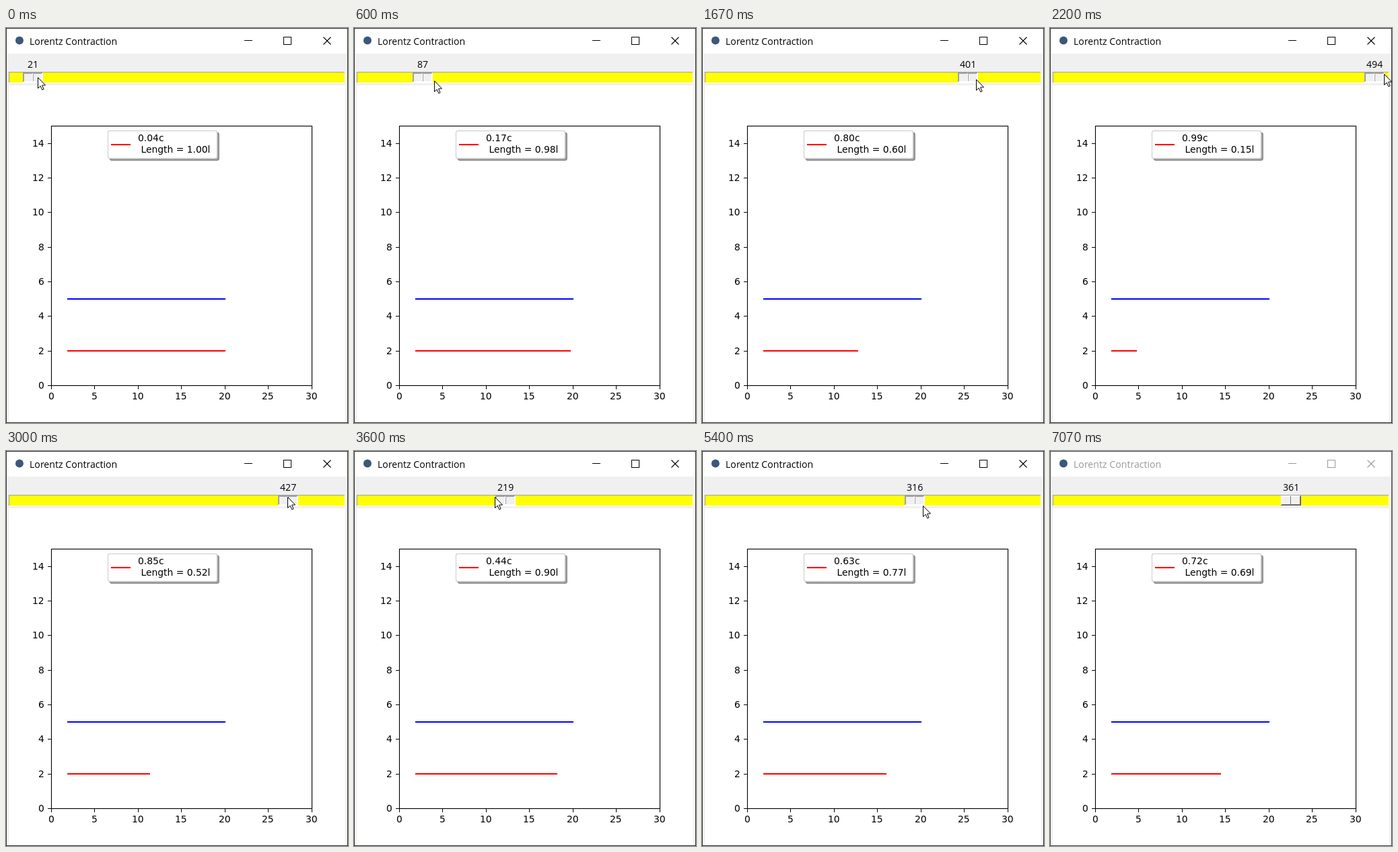
Write an HTML page with a canvas that moves like this. It is 508 by 586 pixels and loops after 7190 ms.

```html
<!DOCTYPE html>
<html lang="en">
<head>
<meta charset="utf-8">
<title>Lorentz Contraction</title>
<style>
  html, body { margin: 0; width: 100%; height: 100%; overflow: hidden; background: #fff; }
  canvas { display: block; }
</style>
</head>
<body>
<canvas id="stage" width="508" height="586"></canvas>
<script>
const ctx = document.getElementById('stage').getContext('2d');

const LOOP = 7190;
const STEP = 200 / 3;
const RELEASE = 87;
const BLUR = 106;

const UI_FONT = '14.15px "Open Sans", "Noto Sans", sans-serif';
const PLOT_FONT = '13.89px "DejaVu Sans", sans-serif';

// Cosine-eased move by `amount` between two steps
function sweep(step, from, to, amount) {
  const u = Math.min(1, Math.max(0, (step - from) / (to - from)));
  return amount * (1 - Math.cos(Math.PI * u)) / 2;
}

// The hand drags right, left, right again, then leaves the window
const sliderValue = s => Math.round(21
  + sweep(s, 0.5, 35.5, 479)
  + sweep(s, 37.35, 67.2, -476)
  + sweep(s, 66.71, 85.47, 337));

const cursorX = s => Math.round(47
  + sweep(s, -0.56, 36.3, 458)
  + sweep(s, 36.5, 66.85, -478)
  + sweep(s, 63.11, 85.49, 333)
  + sweep(s, 87.12, 90.7, -420));

const cursorY = s => Math.round(73
  + sweep(s, 0, 17, 10)
  + sweep(s, 17, 33, -15)
  + sweep(s, 54, 70, 13)
  + sweep(s, 87.12, 90.7, -32));

function rect(x, y, w, h, color) {
  ctx.fillStyle = color;
  ctx.fillRect(x, y, w, h);
}

// `align` is the share of the width left of x; the start snaps to a whole pixel
function text(str, x, y, font, color = '#000', align = 0) {
  ctx.font = font;
  ctx.fillStyle = color;
  ctx.fillText(str, Math.round(x - align * ctx.measureText(str).width), y);
}

function line(x0, y0, x1, y1, color, width) {
  ctx.beginPath();
  ctx.moveTo(x0, y0);
  ctx.lineTo(x1, y1);
  ctx.strokeStyle = color;
  ctx.lineWidth = width;
  ctx.stroke();
}

// One pixel bevel
function bevel(x, y, w, h, topLeft, bottomRight) {
  rect(x, y, w, h, bottomRight);
  rect(x, y, w - 1, 1, topLeft);
  rect(x, y, 1, h - 1, topLeft);
  rect(x + 1, y + 1, w - 2, h - 2, '#f0f0f0');
}

function drawWindow(active) {
  const ink = active ? '#000' : '#999';
  rect(0, 0, 508, 586, active ? '#2b2b2b' : '#484848');
  rect(1, 1, 506, 37, '#fff');
  rect(1, 38, 506, 547, '#f0f0f0');
  rect(4, 85, 500, 500, '#fff');

  ctx.fillStyle = '#3c5878';
  ctx.beginPath();
  ctx.arc(20, 18.5, 6, 0, 7);
  ctx.fill();
  text('Lorentz Contraction', 35, 25, UI_FONT, ink);

  rect(354, 18, 12, 1, ink);
  ctx.strokeStyle = ink;
  ctx.lineWidth = 1;
  ctx.strokeRect(412.5, 13.5, 11, 11);
  line(471.5, 13.5, 482.5, 24.5, ink, 1.1);
  line(482.5, 13.5, 471.5, 24.5, ink, 1.1);
}

function drawSlider(value, pressed) {
  const mid = Math.round(20.4 + 0.9345 * value);
  text(value, mid, 59, UI_FONT, '#000', 0.5);
  rect(4, 65, 500, 17, '#fff');
  rect(4, 65, 499, 16, '#a0a0a0');
  rect(5, 66, 498, 15, '#ff0');
  const edges = pressed ? ['#a0a0a0', '#fff'] : ['#fff', '#696969'];
  bevel(mid - 15, 66, 30, 15, ...edges);
  bevel(mid - 14, 67, 14, 13, ...edges);
  bevel(mid, 67, 14, 13, ...edges);
}

const plotX = x => Math.round(66.5 + 387.5 * x / 30);
const plotY = y => Math.round(530 - 385 * y / 15);

function drawAxes() {
  ctx.strokeStyle = '#000';
  ctx.lineWidth = 1.11;
  ctx.strokeRect(67.5, 145.5, 387, 385);
  for (let x = 0; x <= 30; x += 5) {
    rect(plotX(x), 531, 1, 5, '#000');
    text(x, plotX(x), 551, PLOT_FONT, '#000', 0.5);
  }
  for (let y = 0; y <= 14; y += 2) {
    rect(62, plotY(y), 5, 1, '#000');
    text(y, 57, plotY(y) + 5, PLOT_FONT, '#000', 1);
  }
}

function drawLegend(speed, length) {
  const box = (x, y, fill, edge) => {
    ctx.beginPath();
    ctx.roundRect(x, y, 162, 41, 2.8);
    ctx.fillStyle = fill;
    ctx.fill();
    ctx.strokeStyle = edge;
    ctx.lineWidth = 1.39;
    ctx.stroke();
  };
  const shade = 'rgba(77, 77, 77, 0.5)';
  box(154.3, 155.3, shade, shade);
  box(151.5, 152.5, '#fff', 'rgba(204, 204, 204, 0.8)');
  line(156, 173, 185, 173, '#f00', 2.08);
  text(speed.toFixed(2) + 'c', 195.5, 168, PLOT_FONT);
  text(' Length = ' + length.toFixed(2) + 'l', 195.5, 185, PLOT_FONT);
}

function drawPlot(value) {
  const speed = value / 500;
  const length = Math.sqrt(1 - speed * speed);
  const rod = (y, len, color) =>
    line(plotX(2) - 1, plotY(y), plotX(2 + 18 * len) + 1, plotY(y), color, 2.08);
  drawAxes();
  rod(5, 1, '#00f');
  rod(2, length, '#f00');
  drawLegend(speed, length);
}

function drawCursor(x, y) {
  ctx.save();
  ctx.translate(x + 0.5, y + 0.5);
  const arrow = new Path2D('M0 0V16L3.7 12.6L6.3 18.3L8.6 17.3L6.1 11.6L11 11.4Z');
  ctx.fillStyle = '#fff';
  ctx.fill(arrow);
  ctx.strokeStyle = '#000';
  ctx.lineWidth = 1;
  ctx.stroke(arrow);
  ctx.restore();
}

function draw(now) {
  // times fall on a 10 ms grid
  const t = Math.floor((now % LOOP) / 10) * 10;
  const step = Math.floor((t + 4.999) / STEP);
  const value = sliderValue(step);
  drawWindow(step < BLUR);
  drawSlider(value, step < RELEASE);
  drawPlot(value);
  drawCursor(cursorX(step), cursorY(step));
}

let start;
function tick(now) {
  start ??= now;
  draw(Math.max(0, now - start));
  requestAnimationFrame(tick);
}
draw(0);
requestAnimationFrame(tick);
</script>
</body>
</html>
```
